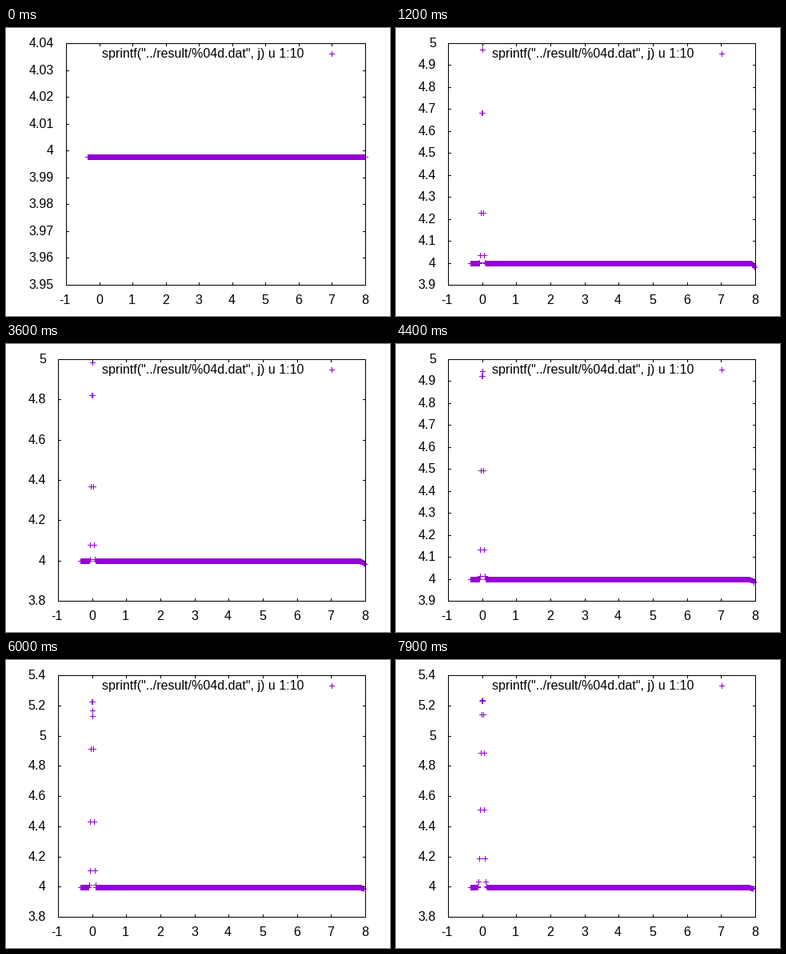
These frames come from a looping animation (480x360 px, 8 s). A matplotlib script:

```python
import numpy as np
import matplotlib.pyplot as plt
from matplotlib.animation import FuncAnimation
from matplotlib.collections import LineCollection

plt.rcParams["font.family"] = "Liberation Sans"

W, H, FRAMES = 480, 360, 80
TOP, BOTTOM, RIGHT = 19, 321, 449
XMIN, XMAX = -1, 8
BASE = 3.9977
SPACING = 0.02
INDEX = np.arange(-18, 401)


def bump(k, t):
    """Height above BASE at particle index k: a pulse that rises and widens."""
    s = t / (FRAMES - 1)
    swell = np.interp(t, [20, 36, 42, 49, 53, 79], [0, -.015, 0, .155, .29, .215])
    height = 1.025 * (1 - np.exp(-t / 4)) + swell
    width = 1.65 + 2.5 * s ** 2.5
    power = 2 + 1.4 * s ** 2
    dip = .24 * np.exp(-((t - 53) / 11) ** 2)
    k = np.abs(k)
    return height * np.exp(-(k / width) ** power) - dip * np.exp(-4 * k ** 2)


def particles(t):
    s = t / (FRAMES - 1)
    settled = 1 - np.exp(-3 * t)

    # The centre particle splits into close twins late in the run.
    split = .25 * np.clip((t - 45) / 10, 0, 1)
    k = np.append(INDEX, [-split, split])

    squeeze = .006 + .013 * s ** 5
    x = SPACING * k - np.sign(k) * squeeze * (1 - np.exp(-.7 * np.abs(k)))
    x -= (.018 * settled + .04 * s ** 2) * np.clip(x / 8, 0, 1) ** 4

    sag = settled * (.0165 - .004 * s) * (.5 + .25 * s) ** (INDEX[-1] - k)
    return x, BASE + bump(k, t) - sag


def tick_step(span):
    power = 10.0 ** np.floor(np.log10(span))
    norm = span / power
    return power * (.2 if norm < 2 else .5 if norm < 5 else 1)


def autoscale(y):
    lo, hi = y.min(), y.max()
    if hi - lo < 1e-9:
        lo, hi = lo * .99, hi * 1.01
    step = tick_step(hi - lo)
    return int(np.floor(lo / step)), int(np.ceil(hi / step)), step


def hline(y, x0, x1):
    return [(x0, y + .5), (x1 + 1, y + .5)]


def vline(x, y0, y1):
    return [(x + .5, y0), (x + .5, y1 + 1)]


def plus(x, y):
    return [hline(y, x - 3, x + 3), vline(x, y - 3, y + 3)]


def pixel(v):
    return np.ceil(np.asarray(v) - .5)


fig = plt.figure(figsize=(W / 72, H / 72), dpi=72, facecolor="white")
ax = fig.add_axes([0, 0, 1, 1])
ax.set(xlim=(0, W), ylim=(H, 0))
ax.axis("off")


def lines(color, z):
    group = LineCollection([], colors=color, linewidths=1, antialiaseds=False,
                           capstyle="butt", zorder=z)
    group.set_snap(False)
    return ax.add_collection(group, autolim=False)


def label(text="", ha="center", x=0, y=0):
    return ax.text(x, y, text, ha=ha, va="baseline", fontsize=16,
                   color="black", zorder=4)


points = lines("#9400d3", 2)
border = lines("black", 3)
x_labels = [label(str(v), y=345) for v in range(XMIN, XMAX + 1)]
y_labels = [label(ha="right") for _ in range(16)]
label('sprintf("../result/%04d.dat", j) u 1:10', "right", 372, 37)


def update(t):
    x, y = particles(t)
    first, last, step = autoscale(y)
    names = [f"{n * step:g}" for n in range(first, last + 1)]
    left = 75 if max(map(len, names)) > 3 else 65

    def to_x(v):
        return pixel(left + (np.asarray(v) - XMIN) * (RIGHT - left) / (XMAX - XMIN))

    def to_y(v):
        return BOTTOM - pixel((np.asarray(v) / step - first) * (BOTTOM - TOP) / (last - first))

    marks = plus(407, 32)
    for px, py in sorted(set(zip(to_x(x), to_y(y)))):
        marks += plus(px, py)
    points.set_segments(marks)

    segs = [hline(TOP, left, RIGHT), hline(BOTTOM, left, RIGHT),
            vline(left, TOP, BOTTOM), vline(RIGHT, TOP, BOTTOM)]
    for v, text in zip(range(XMIN, XMAX + 1), x_labels):
        px = to_x(v)
        segs += [vline(px, TOP, TOP + 3), vline(px, BOTTOM - 3, BOTTOM)]
        text.set_x(px - .5 - (v < 0))
    for text in y_labels:
        text.set_text("")
    for n, name, text in zip(range(first, last + 1), names, y_labels):
        py = to_y(n * step)
        segs += [hline(py, left, left + 3), hline(py, RIGHT - 3, RIGHT)]
        text.set_text(name)
        text.set_position((left - 15, py + 5))
    border.set_segments(segs)
    return [points, border, *x_labels, *y_labels]


anim = FuncAnimation(fig, update, frames=FRAMES, interval=100,
                     init_func=lambda: update(0), repeat=True,
                     repeat_delay=0, blit=False)
plt.show()
```
